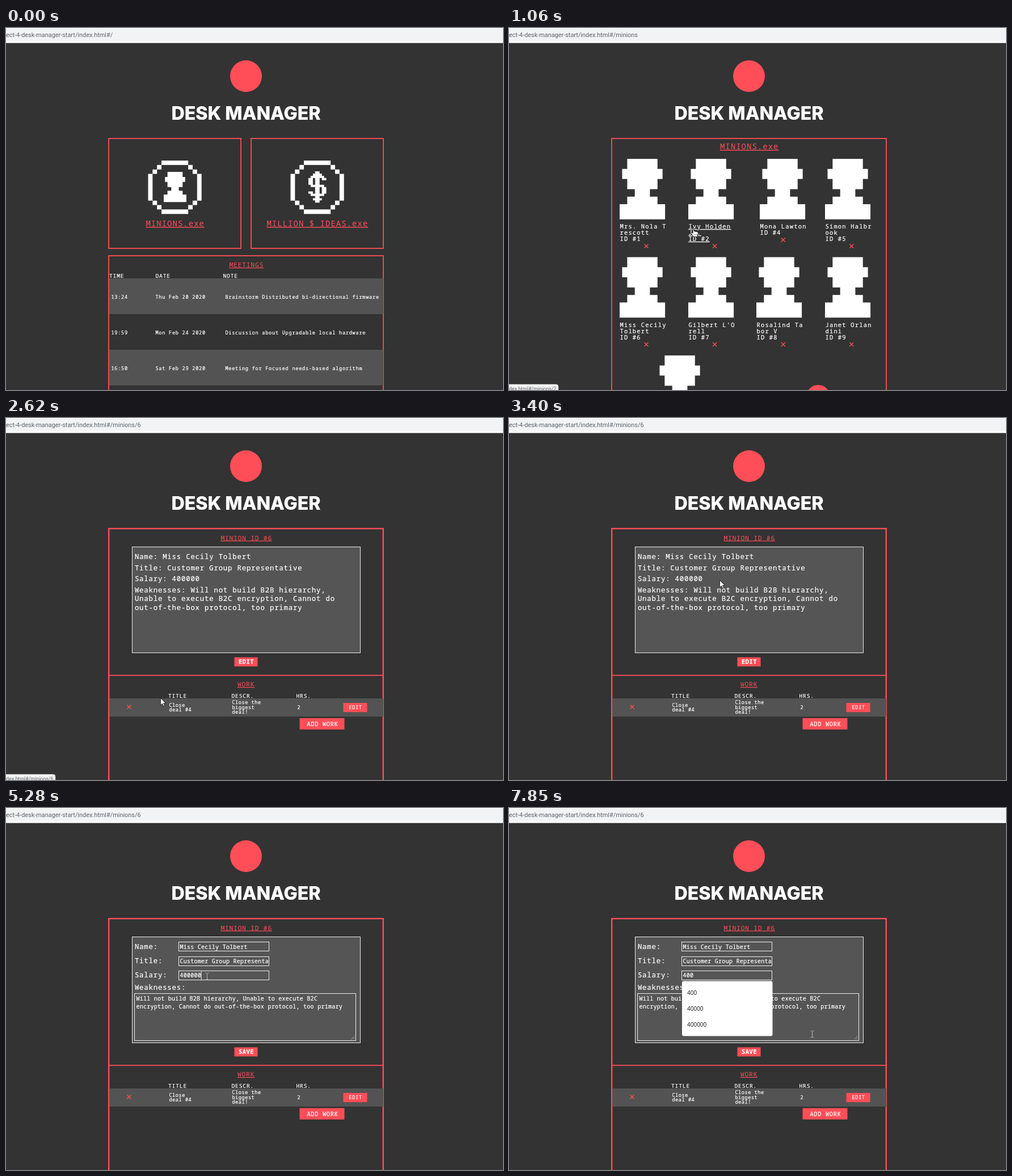
Animation of 876x639 px, one loop 8000 ms. Source, as an HTML page:

```html
<!DOCTYPE html>
<html lang="en">
<head>
<meta charset="utf-8">
<title>Desk Manager</title>
<style>
html, body { margin: 0; width: 100%; height: 100%; overflow: hidden; background: #333; }
svg { display: block; }
text { font-family: "Noto Sans Mono", "DejaVu Sans Mono", monospace; fill: #fff; font-weight: 500; stroke: #fff; stroke-width: .22; }
.bar { font-family: Roboto, sans-serif; font-weight: 400; fill: #5f6368; stroke: none; }
.title { font: 800 32.2px Inter, sans-serif; text-anchor: middle; }
.option { font: 10px "Open Sans", sans-serif; fill: #111; stroke: none; }
.link { fill: #ff4e57; font-weight: 400; text-decoration: underline; stroke: none; }
.bold { font-weight: 700; }
.red { fill: #ff4e57; }
.row { fill: #535353; }
.frame { fill: none; stroke: #ff4e57; stroke-width: 1.8; }
.thick { stroke-width: 2.4; }
.field { fill: #555; stroke: #fff; stroke-width: .9; }
.button { fill: #ff4e57; stroke: #ff4e57; stroke-width: 1.6; }
.hover text { text-decoration: underline; }
.hot { stroke: #fff; }
</style>
</head>
<body>
<svg id="stage" width="876" height="639" viewBox="0 0 876 639"></svg>
<script>
const LOOP = 8000;
const PERSON = 'M3 0h12v4h2v4h-2v4h-3v3h3v3h3v6H0v-6h3v-3h3v-3H3V8H1V4h2z';
const DOLLAR = 'M3 0h2v14h-2zM2 1h4v1h-4zM1 2h6v1h-6zM0 3h2v3h-2zM6 3h2v1h-2zM1 6h6v1h-6zM6 7h2v3h-2zM0 9h2v1h-2zM1 10h6v1h-6zM2 12h4v1h-4z';
const RING = 'M3 0h6v1h-6zM2 1h1v1h-1zM9 1h1v1h-1zM1 2h1v1h-1zM10 2h1v1h-1zM0 3h1v6h-1zM11 3h1v6h-1zM1 9h1v1h-1zM10 9h1v1h-1zM2 10h1v1h-1zM9 10h1v1h-1zM3 11h6v1h-6z';

// Monospaced text: glyph size and advance per character
const text = (x, y, str, size, adv, cls = '', id = '') =>
  `<text x="${x + .4}" y="${y}" class="${cls}" id="${id}" font-size="${size}" letter-spacing="${(adv - size * .6).toFixed(2)}">${str}</text>`;
const rect = (x, y, w, h, cls = '', extra = '') =>
  `<rect x="${x}" y="${y}" width="${w}" height="${h}" class="${cls}" ${extra}/>`;
const shape = (d, x, y, k) =>
  `<path d="${d}" fill="#fff" transform="translate(${x} ${y}) scale(${k})"/>`;
const cross = (x, y) =>
  `<path d="M${x - 3.5} ${y - 3.5}l7 7m0-7l-7 7" stroke="#ff4e57" stroke-width="1.4"/>`;
const group = (id, body) => `<g id="${id}">${body}</g>`;

const big = (x, y, s) => text(x, y, s, 12.3, 8.21);
const head = (x, y, s) => text(x, y, s, 9.6, 6.65);
const small = (x, y, s, adv = 5.9) => text(x, y, s, 8.5, adv);
const input = (x, y, s, id) => text(x, y, s, 10, 6.27, '', id);

function home() {
  const meetings = [
    ['13:24', 'Thu Feb 20 2020', 'Brainstorm Distributed bi-directional firmware'],
    ['19:59', 'Mon Feb 24 2020', 'Discussion about Upgradable local hardware'],
    ['16:50', 'Sat Feb 29 2020', 'Meeting for Focused needs-based algorithm']];
  return rect(181, 195, 233, 194, 'frame', 'id="tile"') + rect(432, 195, 233, 194, 'frame') +
    shape(RING, 250.5, 234, 7.85) + shape(PERSON, 278, 254, 2.22) +
    shape(RING, 501.5, 234, 7.85) + shape(DOLLAR, 533, 253, 3.95) +
    text(246, 350, 'MINIONS.exe', 14, 9.42, 'link') +
    text(459, 350, 'MILLION $ IDEAS.exe', 14, 9.42, 'link') +
    rect(181, 402, 484, 300, 'frame') +
    text(393, 422, 'MEETINGS', 11.4, 7.6, 'link') +
    head(181.5, 441, 'TIME') + head(263, 441, 'DATE') + head(382, 441, 'NOTE') +
    meetings.map(([time, date, note], i) => {
      const y = 442 + i * 63;
      return (i % 2 ? '' : rect(182, y, 483, 63, 'row')) +
        small(185, y + 35.5, time) + small(263, y + 35.5, date) + small(386, y + 35.5, note);
    }).join('');
}

function minions() {
  const people = [
    [1, 195, 231, 'Mrs. Nola T', 'rescott'], [2, 316, 231, 'Ivy Holden', 'Jr.'],
    [4, 442, 231, 'Mona Lawton'], [5, 557, 231, 'Simon Halbr', 'ook'],
    [6, 195, 404.5, 'Miss Cecily', 'Tolbert'], [7, 316, 404.5, "Gilbert L'O", 'rell'],
    [8, 436, 404.5, 'Rosalind Ta', 'bor V'], [9, 557, 404.5, 'Janet Orlan', 'dini']];
  return rect(181, 195, 484, 500, 'frame') +
    text(371.5, 214, 'MINIONS.exe', 14, 9.42, 'link') +
    people.map(([id, x, y, ...lines], i) => {
      lines.push('ID #' + id);
      return group('p' + id, shape(PERSON, x, y, 4.45) +
        lines.map((s, n) => text(x, y + 123 + n * 11, s, 10.4, 7.5)).join('')) +
        cross(242 + i % 4 * 120.6, y + 121 + lines.length * 11);
    }).join('') +
    shape(PERSON, 261, 578, 4.45) +
    '<circle cx="545" cy="651" r="21" class="red"/>';
}

function detail() {
  return rect(181.2, 195.2, 483.6, 500, 'frame thick') +
    text(378, 215.5, 'MINION ID #6', 11.4, 7.55, 'link') +
    rect(222.5, 227.5, 402, 187, 'field') +
    rect(403.3, 423.3, 39.4, 14.4, 'button', 'id="button"') + text(409.5, 434, 'EDIT', 10.4, 6.8, 'bold', 'action') +
    rect(180, 453.4, 486, 1.8, 'red') +
    text(407.5, 474, 'WORK', 11.4, 7.6, 'link') +
    head(285.5, 493.5, 'TITLE') + head(397, 493.5, 'DESCR.') + head(511, 493.5, 'HRS.') +
    rect(182, 495, 483, 32, 'row') + cross(217, 510) +
    small(287, 509.5, 'Close', 5.7) + small(287, 518, 'deal #4', 5.7) +
    small(398, 505, 'Close the', 5.7) + small(398, 513.5, 'biggest', 5.7) + small(398, 522, 'deal!', 5.7) +
    small(513, 513.5, '2', 5.7) +
    rect(595.3, 503.8, 40.4, 14.6, 'button') + small(604, 514, 'EDIT') +
    rect(518.3, 530.6, 77.4, 18.4, 'button') + text(530, 544, 'ADD WORK', 10.2, 6.9);
}

const view = () => big(226.5, 248.5, 'Name: Miss Cecily Tolbert') +
  big(226.5, 268.5, 'Title: Customer Group Representative') +
  big(226.5, 288, 'Salary: 400000') +
  big(226.5, 307.5, 'Weaknesses: Will not build B2B hierarchy,') +
  big(226.5, 323.2, 'Unable to execute B2C encryption, Cannot do') +
  big(226.5, 339, 'out-of-the-box protocol, too primary');

const edit = () => big(226.5, 248.5, 'Name:') + big(226.5, 273.5, 'Title:') +
  big(226.5, 299, 'Salary:') + big(226.5, 320.5, 'Weaknesses:') +
  [236.5, 262.5, 287.5].map(y => rect(304.5, y, 159, 16, 'field')).join('') +
  input(306, 248.5, 'Miss Cecily Tolbert') + input(306, 274, 'Customer Group Representa') +
  input(306, 299, '400000', 'salary') +
  rect(226.5, 327.5, 390, 83, 'field') +
  input(229, 340, 'Will not build B2B hierarchy, Unable to execute B2C') +
  input(229, 353.5, 'encryption, Cannot do out-of-the-box protocol, too primary') +
  '<path d="M608.5 408.5l6-6m-2.500 6l2.500-2.500" stroke="#bbb" stroke-width=".8"/>' +
  rect(0, 288.5, 1, 14, '', 'fill="#fff" id="caret"');

const options = () => rect(305, 305.5, 159.5, 68, '', 'rx="3" fill="#fff" id="list"') +
  [0, 1, 2].map(i => `<text class="option" x="314" y="${329.5 + i * 28.3}"></text>`).join('');

document.getElementById('stage').innerHTML =
  rect(0, 0, 876, 639, '', 'fill="#333"') + rect(0, 0, 876, 26.5, '', 'fill="#fff"') +
  rect(0, 1, 876, 21.5, '', 'fill="#f1f3f4"') +
  '<text id="url" class="bar" y="16" font-size="10.9"></text>' +
  '<circle cx="423" cy="85" r="28" class="red"/><text class="title" x="423" y="162">DESK MANAGER</text>' +
  group('home', home()) + group('minions', minions()) + group('detail', detail()) +
  group('view', view()) + group('edit', edit()) + group('options', options()) +
  group('status', '<path d="M-1 640v-11H83q4 0 4 4v7z" fill="#f4f4f4" stroke="#ccc" stroke-width=".6"/>' +
    '<text id="hint" class="bar" y="640" font-size="8.9"></text>') +
  '<circle id="click" r="9.500" fill="#f7ee1f" opacity=".72"/>' +
  group('arrow', '<path d="M.5.5v12.500l3-2.800 2 4.600 2-.9-2-4.500h4z" fill="#fff" stroke="#111" stroke-width=".8"/>') +
  group('hand', '<path d="M-1 1q1-1.400 2 0v5.500l5.500 1.300q2 .5 2 2.500l-1.500 6.200h-6.500l-4.500-6q0-2 1.800-1.200l1.200 1.200z" fill="#fff" stroke="#111" stroke-width=".9"/><path d="M2.500 11.500v3m2-3v3m2-3v3" stroke="#444" stroke-width=".6"/>') +
  group('beam', '<path d="M-1.500-5.500h2l1 1 1-1h2M1.500-4.500v10M-1.500 6h2l1-1 1 1h2" fill="none" stroke="#bbb"/>');

const el = {};
document.querySelectorAll('[id]').forEach(n => { if (n.id) el[n.id] = n; });
const people = [...document.querySelectorAll('#minions > g')];
const optionTexts = [...document.querySelectorAll('.option')];

// time, x, y, pointer, hovered item
const MOVES = [
  [0, -50, -50, 'arrow'], [350, 708, 602, 'arrow'], [430, 520, 440, 'arrow'], [520, 312, 310, 'hand', 'tile'],
  [750, 312, 310, 'arrow'], [830, 318, 326, 'hand', 2], [900, 322, 342, 'hand', 2], [980, 325, 352, 'hand', 2],
  [1310, 390, 342, 'hand', 2], [1380, 450, 339, 'hand', 4], [1460, 478, 358, 'hand', 4],
  [1530, 490, 397, 'arrow'], [1610, 485, 462, 'hand', 8],
  [1840, 450, 458, 'hand', 8], [1920, 405, 474, 'arrow'], [1990, 370, 484, 'hand', 7],
  [2070, 325, 490, 'hand', 7], [2150, 272, 494, 'hand', 6],
  [2620, 272, 494, 'arrow'], [2940, 340, 450, 'arrow'], [3010, 420, 410, 'arrow'], [3090, 470, 397, 'arrow'],
  [3320, 420, 340, 'arrow'], [3400, 371, 286, 'arrow'],
  [3730, 392, 345, 'arrow'], [3800, 421, 438, 'hand', 'button'], [3870, 424, 436, 'hand', 'button'],
  [4260, 425, 431, 'hand', 'button'], [4330, 426, 428, 'hand', 'button'],
  [4650, 410, 395, 'beam'], [4720, 375, 330, 'beam'], [4800, 353, 297, 'beam'],
  [7700, 400, 325, 'arrow'], [7780, 495, 380, 'beam'], [7850, 533, 399, 'beam']];
const SCENES = [[0, 'home', ''], [750, 'minions', 'minions'], [2620, 'view', 'minions/6'], [4180, 'edit', 'minions/6']];
const HINTS = [[0, 0], [1060, 2], [1380, 4], [1610, 8], [1990, 7], [2150, 6], [2940, 0]];
const SALARY = [[0, '400000'], [5740, '40000'], [5980, '4000'], [6600, '400']];
const CARET = [[0, 0], [5200, 1], [5740, 0], [6280, 1], [6600, 0], [6770, 1], [7310, 0]];
const CLICKS = [670, 2540, 4100, 5200];

const at = (table, t) => table.findLast(row => row[0] <= t);
const show = (node, on) => { node.style.display = on ? '' : 'none'; };

function draw(t) {
  const [, scene, path] = at(SCENES, t);
  const [, x, y, pointer, hover] = at(MOVES, t);
  const hint = at(HINTS, t)[1], salary = at(SALARY, t)[1];

  for (const id of ['home', 'minions', 'view', 'edit']) show(el[id], id === scene);
  show(el.detail, scene === 'view' || scene === 'edit');
  el.url.textContent = 'ect-4-desk-manager-start/index.html#/' + path;
  el.action.textContent = scene === 'edit' ? 'SAVE' : 'EDIT';
  el.salary.textContent = salary;

  for (const p of people) p.classList.toggle('hover', p.id === 'p' + hover);
  el.tile.classList.toggle('hot', hover === 'tile');
  el.button.classList.toggle('hot', hover === 'button');

  show(el.status, hint);
  el.hint.textContent = 'dex.html#/minions/' + hint;
  show(el.caret, at(CARET, t)[1]);
  el.caret.setAttribute('x', 306 + salary.length * 6.27);

  const items = salary === '400' ? ['400', '40000', '400000'] : ['40000', '400000'];
  show(el.options, t >= 5810);
  el.list.setAttribute('height', 12 + items.length * 28.3);
  optionTexts.forEach((n, i) => { n.textContent = items[i] || ''; });

  for (const id of ['arrow', 'hand', 'beam', 'click']) el[id].setAttribute('transform', `translate(${x} ${y})`);
  for (const id of ['arrow', 'hand', 'beam']) show(el[id], id === pointer);
  show(el.click, CLICKS.some(c => t >= c && t < c + 80));
}

function tick() {
  draw(performance.now() % LOOP);
  requestAnimationFrame(tick);
}
tick();
</script>
</body>
</html>
```
